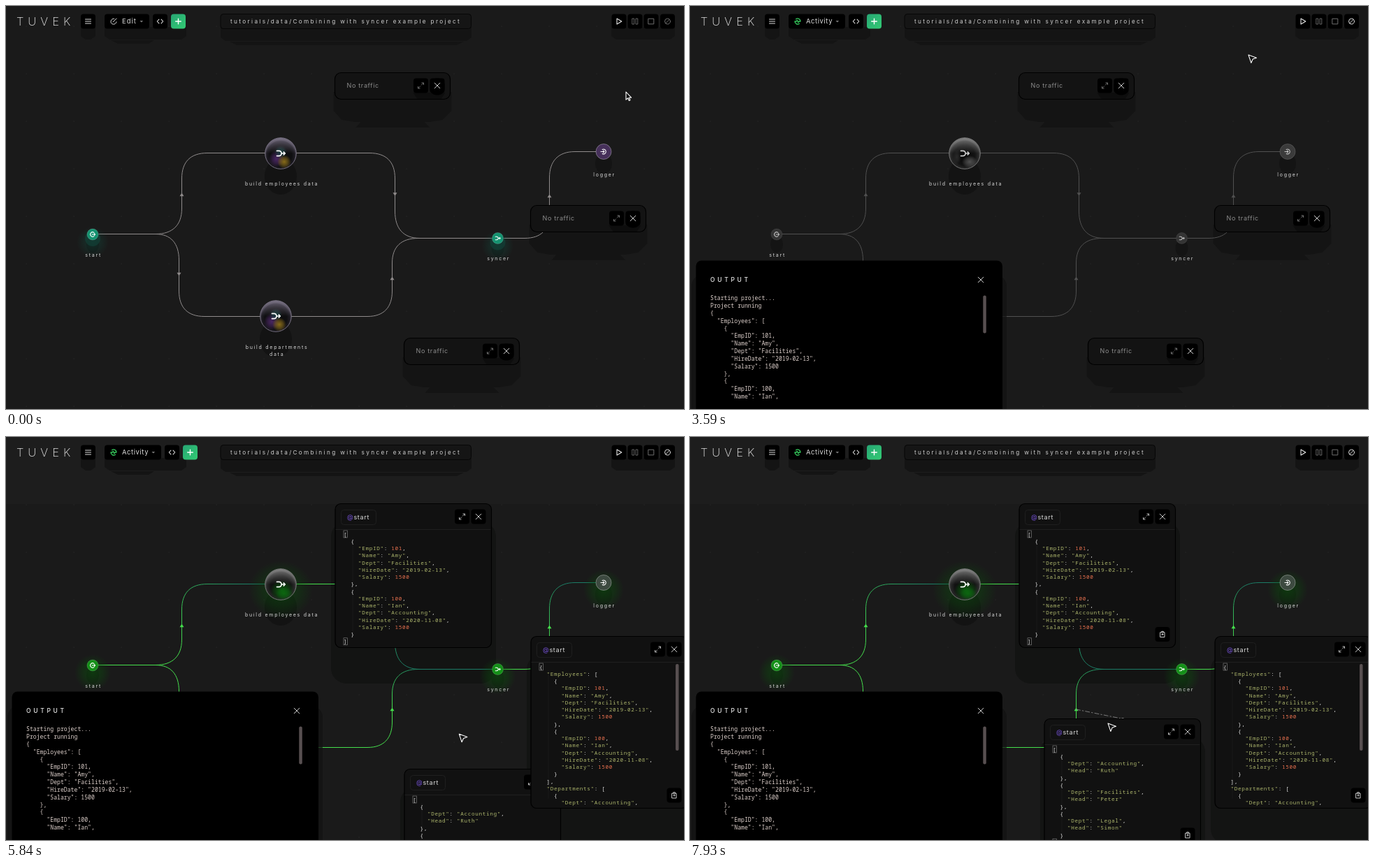
Animation, 970 px wide and 577 px high, one loop 8 s. Source, as an HTML page:

```html
<!DOCTYPE html>
<html lang="en">
<head>
<meta charset="utf-8">
<title>Flow editor</title>
<style>
html, body { margin: 0; width: 100%; height: 100%; overflow: hidden; background: #1a1a1a; }
svg { display: block; width: 970px; height: 577px; }
text { font-family: Inter, sans-serif; white-space: pre; }
.mono { font-family: "Noto Sans Mono", "DejaVu Sans Mono", monospace; }
.line { fill: none; stroke-linecap: round; stroke-linejoin: round; }
</style>
</head>
<body>
<svg id="stage" viewBox="0 0 970 577" xmlns="http://www.w3.org/2000/svg"></svg>
<script>
const LOOP = 8000, STEP = 150, LEAD = 140;
const stage = document.getElementById('stage');

const box = (x, y, w, h, fill, r = 0, extra = '') =>
  `<rect x="${x}" y="${y}" width="${w}" height="${h}" rx="${r}" fill="${fill}" ${extra}/>`;
const line = (d, color, w = 1, extra = '') =>
  `<path class="line" d="${d}" stroke="${color}" stroke-width="${w}" ${extra}/>`;
const shape = (d, fill, extra = '') => `<path d="${d}" fill="${fill}" ${extra}/>`;
const oval = (x, y, rx, ry, fill, extra = '') =>
  `<ellipse cx="${x}" cy="${y}" rx="${rx}" ry="${ry}" fill="${fill}" ${extra}/>`;
const label = (x, y, s, size, fill, gap = 0, extra = '') =>
  `<text x="${x}" y="${y}" font-size="${size}" fill="${fill}" letter-spacing="${gap}" ${extra}>${s}</text>`;
const at = (x, y, body, scale = 1) => `<g transform="translate(${x} ${y}) scale(${scale})">${body}</g>`;
const group = (id, body) => `<g id="${id}">${body}</g>`;

// Data shown in the panels
const employees = [
  { EmpID: 101, Name: 'Amy', Dept: 'Facilities', HireDate: '2019-02-13', Salary: 1500 },
  { EmpID: 100, Name: 'Ian', Dept: 'Accounting', HireDate: '2020-11-08', Salary: 1500 }
];
const departments = [
  { Dept: 'Accounting', Head: 'Ruth' },
  { Dept: 'Facilities', Head: 'Peter' },
  { Dept: 'Legal', Head: 'Simon' }
];
const rows = data => JSON.stringify(data, null, 2).split('\n');
const merged = rows({ Employees: employees, Departments: departments });

// Gradients
const stops = list => list.map(([o, c, a = 1]) =>
  `<stop offset="${o}" stop-color="${c}" stop-opacity="${a}"/>`).join('');
const radial = (id, list, extra = '') => `<radialGradient id="${id}" ${extra}>${stops(list)}</radialGradient>`;
const linear = (id, list, dir = 'x2="0" y2="1"') => `<linearGradient id="${id}" ${dir}>${stops(list)}</linearGradient>`;
const wire = (id, x1, y1, x2, y2) => linear(id, [[0, '#45df4c'], [1, '#1b7c66']],
  `gradientUnits="userSpaceOnUse" x1="${x1}" y1="${y1}" x2="${x2}" y2="${y2}"`);
const glow = (id, c, a) => radial(id, [[0, c, a], [0.55, c, a * 0.55], [1, c, 0]]);
const defs = `<defs>
  <pattern id="dots" x="-5" y="63" width="68" height="68" patternUnits="userSpaceOnUse">
    <rect x="33.5" y="33.5" width="1.2" height="1.2" fill="#282828"/></pattern>
  ${linear('add', [[0, '#27a674'], [1, '#33cb74']], 'x2="1" y2="1"')}
  ${wire('w0', 240, 300, 350, 211)}${wire('w1', 248, 390, 350, 444)}${wire('w2', 450, 211, 590, 300)}
  ${wire('w3', 552, 390, 598, 332)}${wire('w4', 765, 290, 800, 209)}
  ${glow('purple', '#7a3ba6', 0.55)}${glow('gold', '#a5821c', 0.8)}${glow('teal', '#1d8076', 0.4)}
  ${glow('green', '#0c6a10', 0.85)}${glow('halo', '#0a500c', 0.6)}${glow('shine', '#909090', 0.5)}
  ${glow('mint', '#0f5c4b', 0.35)}
  ${radial('glass', [[0, '#0a0a0c'], [0.7, '#0f0f11'], [0.9, '#1d1b22'], [1, '#45414c']], 'cy=".56"')}
  ${radial('smoke', [[0, '#050505'], [0.65, '#131313'], [0.9, '#2a2a2a'], [1, '#505050']], 'cy=".56"')}
  ${linear('cap', [[0, '#a79db5', 0.5], [0.5, '#a79db5', 0]])}
  ${linear('fog', [[0, '#b0b0b0', 0.5], [0.5, '#b0b0b0', 0]])}
  <clipPath id="feed"><rect x="20" y="405" width="400" height="160"/></clipPath>
</defs>`;

// Icons, drawn around 0,0
const icon = {
  merge: c => line('M-5.5-3.6H-2.5A3.6 3.6 0 0 1-2.5 3.6H-5.5M1 0H6.2M4.3-2L6.3 0 4.3 2', c, 1.7),
  out: c => line('M2.2-3A3.8 3.8 0 1 0 2.2 3M-1 0H4.2M2.7-1.6L4.3 0 2.7 1.6', c, 1.2),
  into: c => line('M-2-3.3A3.8 3.8 0 1 1-2 3.3M-4.5 0H1M-.6-1.6L1 0-.6 1.6', c, 1.2),
  close: c => line('M-3.8-3.8L3.8 3.8M3.8-3.8L-3.8 3.8', c, 0.9),
  expand: c => line('M1-1L3.8-3.8M1.4-4H4V-1.4M-1 1L-3.8 3.8M-1.4 4H-4V1.4', c, 0.8),
  menu: c => line('M-4-3H4M-4 0H4M-4 3H4', c, 1),
  code: c => line('M-1.6-2.8L-4.2 0-1.6 2.8M1.6-2.8L4.2 0 1.6 2.8', c, 1.1),
  plus: c => line('M-3.8 0H3.8M0-3.8V3.8', c, 1.4),
  edit: c => line('M.8-3.8A4 4 0 1 0 4 .8M-1 1L4-4', c, 1),
  pulse: c => line('M-2.4-3.2A4 4 0 0 1 4 0M2.4 3.2A4 4 0 0 1-4 0M-4 0H-2L-.6-1.6 .8 1.6 2 0H4', c, 1.3),
  play: c => line('M-3-4L3.8 0-3 4Z', c, 1.1),
  pause: c => line('M-3.8-4H-1.4V4H-3.8ZM1.4-4H3.8V4H1.4Z', c, 0.9),
  stop: c => line('M-3.8-3.8H3.8V3.8H-3.8Z', c, 1),
  ban: c => line('M4 0A4 4 0 1 1-4 0A4 4 0 1 1 4 0M-2.8 2.8L2.8-2.8', c, 1),
  again: c => line('M2.8-1.8A3.5 3.5 0 1 0 3.5 .8M3.2-4.4V-1.6H.4', c, 1.2),
  clip: c => line('M-3-2.8H3V4H-3ZM-1.3-2.8V-4.2H1.3V-2.8M-1.2 0H1.2M0-1.2V1.2', c, 0.9)
};
const button = (x, y, name, c = '#dcdcdc', size = 21) =>
  at(x, y, box(-size / 2, -size / 2, size, size, '#000', 4) + icon[name](c));

// Toolbar
const shade = '#141414';
const drop = (x, w, h = 17) => shape(
  `M${x} 30H${x + w}V${26 + h}L${x + w - 7} ${31 + h}H${x + 7}L${x} ${26 + h}Z`, shade);

const backdrop = defs + box(0, 0, 970, 577, '#1a1a1a') + box(0, 0, 970, 577, 'url(#dots)');
const bar = drop(107, 21) + drop(141, 117) + drop(307, 359, 19) + drop(866, 91) +
  shape('M150 49H212L204 54H160ZM320 51H655L645 56H330Z', shade) +
  label(15, 28, 'TUVEK', 16.5, '#ececec', 6, 'font-weight="200"') +
  button(117.5, 22, 'menu') +
  box(307, 11.5, 358.5, 21, '#151515', 4, 'stroke="#060606"') +
  label(321, 24.6, 'tutorials/data/Combining with syncer example project', 8.2, '#cfcfcf', 2.37);

const mode = (name, glyph, tint, w, gap) =>
  box(141, 11.5, w, 21, '#000', 4) + at(154, 22, icon[glyph](tint)) +
  label(166, 25.3, name, 9.5, '#dcdcdc', gap) +
  shape(`M${w + 127.5} 21h4.6l-2.3 2.6Z`, '#777') +
  button(w + 156.5, 22, 'code') +
  at(w + 182.5, 22, box(-10.5, -10.5, 21, 21, 'url(#add)', 4) + icon.plus('#fff'));

const controls = (first, stop, ban) =>
  button(877, 22, first, '#e6e6e6') + button(900, 22, 'pause', '#6e6e6e') +
  button(923, 22, 'stop', stop) + button(946.5, 22, 'ban', ban);

// Graph
const wires = [
  'M132 326.5H214C238 326.5 251.5 314 251.5 290V247C251.5 223 264 210.5 288 210.5H371',
  'M132 326.5H214C236 326.5 247.5 340 247.5 364V408C247.5 432 260 444.5 284 444.5H364',
  'M415 210.5H520C544 210.5 556.5 223 556.5 247V294C556.5 318 568 332.5 592 332.5H696',
  'M408 444.5H517C541 444.5 552.5 431 552.5 408V368C552.5 345 565 332.5 590 332.5H592',
  'M712 332.5H742C766 332.5 777.5 320 777.5 297V246C777.5 222 790 208.5 814 208.5H844'
];
const arrows = [[251.5, 270, 1], [247.5, 384, -1], [556.5, 269.5, -1], [552.5, 390, 1], [777.5, 272, 1]];

const orb = (x, y, state) => {
  const live = state === 2, gray = state > 0;
  const spots = [
    oval(-6, 8, 11, 12, 'url(#purple)') + oval(0, -2, 9, 9, 'url(#teal)') + oval(5, 12, 10, 10, 'url(#gold)'),
    oval(7, 12, 11, 9, 'url(#shine)') + oval(-11, 5, 6, 11, 'url(#shine)', 'opacity=".4"'),
    oval(2, 9, 17, 15, 'url(#green)') + oval(5, 13, 12, 9, 'url(#green)')
  ][state];
  return at(x, y,
    oval(0, 33, 23, 26, '#131313') +
    (live ? oval(0, 8, 46, 42, 'url(#halo)') : '') +
    oval(0, 0, 22.3, 22.3, gray ? 'url(#smoke)' : 'url(#glass)') + spots +
    oval(0, 0, 22.3, 22.3, gray ? 'url(#fog)' : 'url(#cap)', `stroke="${gray ? '#7c7c7c' : '#7d768a'}" stroke-width=".9"`) +
    icon.merge(state === 1 ? '#cfcfcf' : '#fff'));
};

const pin = (x, y, r, glyph, state, fills, scale) => at(x, y,
  oval(0, r + 6, r + 1, r + 4, '#141414') +
  (state === 2 ? oval(0, 10, r + 18, r + 18, 'url(#halo)') : '') +
  (state === 0 && r < 9 ? oval(0, 11, 23, 22, 'url(#mint)') + oval(0, 6, 11, 11, '#12443a', 'opacity=".6"') : '') +
  oval(0, 0, r, r, fills[state], `stroke="${state === 1 ? '#909090' : '#fff'}" stroke-opacity="${r > 9 ? 0.4 : 0.2}" stroke-width=".8"`) +
  at(0, 0, icon[glyph](state === 1 ? '#c0c0c0' : '#fff'), scale));

const names = [
  [394.6, 257.3, 'build employees data'], [387.6, 491.2, 'build departments'], [387.6, 501.4, 'data'],
  [125.2, 358.6, 'start'], [704.7, 364.3, 'syncer'], [856.1, 243.5, 'logger']
].map(([x, y, s]) => label(x, y, s, 7, '#d6d6d6', 1.74, 'text-anchor="middle"')).join('');

const graph = state => {
  const ink = ['#8f8b8b', '#505050', '#45df4c'][state];
  const leaf = ['#159270', '#343434', '#149018'];
  return wires.map((d, i) => line(d, state === 2 ? `url(#w${i})` : ink)).join('') +
    arrows.map(([x, y, dir]) => at(x, y, shape(`M-3 ${2.2 * dir}H3L0 ${-2.6 * dir}Z`, ink))).join('') +
    orb(393, 211, state) + orb(386, 444, state) +
    pin(124, 327, 8, 'out', state, leaf, 0.85) +
    pin(703.5, 332.5, 8, 'merge', state, leaf, 0.6) +
    pin(855, 208.5, 11, 'into', state, ['#46305a', '#3b3b3b', '#3d4a40'], 0.9) + names;
};

// Traffic panels; their shadows lie under the graph
const idleSpots = [[470.5, 95], [750.5, 285], [569.5, 475]];
const idleShade = ([x, y]) => at(x, y,
  shape('M-2 28L-2 55 10 68 28 71 37 71 30 79H136L128 71 136 71 154 68 167 55V28Z', shade));
const idle = ([x, y]) => at(x, y,
  box(0, 0.5, 165, 38, '#131313', 9, 'stroke="#000" stroke-width="1.2"') +
  shape('M112 29H158L152 38H118Z', '#0d0d0d') +
  label(17, 22.2, 'No traffic', 9, '#8c8c8c', 0.67) +
  button(123, 19, 'expand', '#8a8a8a') + box(136, 8.5, 21, 24, '#000', 9) + button(146.5, 19, 'close', '#e2e2e2'));

const ROW = 10.25, CHAR = 5.25;
const paint = s => s.replace(/("[^"]*")(:?)|(\d+)/g, (all, str, colon, num) =>
  str ? `<tspan fill="#acb56c">${str}</tspan>${colon}` : `<tspan fill="#e8714f">${num}</tspan>`);
const listing = lines => lines.map((s, i) => {
  const pad = s.search(/\S/);
  return label(12 + pad * CHAR, 46.6 + i * ROW, paint(s.trim()), 7.7, '#e4e4e4', 0.63, 'class="mono"');
}).join('');
const mark = i => box(12, 39 + i * ROW, 5.5, 10, 'none', 0, 'stroke="#777" stroke-width=".7"');

const panelShade = (id, x, y, h) => `<g id="${id}Shade" transform="translate(${x} ${y})">` +
  box(-6, 26, 236, h + 25, '#131413', 22) + '</g>';
const panel = (id, x, y, h, lines, extra) => `<g id="${id}" transform="translate(${x} ${y})">` +
  box(0, 0.5, 223.5, h - 1, '#111', 8, 'stroke="#000" stroke-width="1.2"') +
  line('M1 37.5H222', '#202020') +
  box(8.5, 9.5, 50, 21, '#111', 4, 'stroke="#1f1f1f"') +
  label(17, 23, '<tspan fill="#7a55e0">@</tspan>start', 9, '#dedede', 0.7) +
  button(181.5, 19, 'expand') + button(205, 19, 'close') +
  line(`M25 50V${h - 15}`, '#242424', 0.6) + mark(0) + listing(lines) + extra + '</g>';
const clip = (id, y) => group(id, button(205, y, 'clip'));

const spots = { emp: ['empPanel', 471, 95, 207], dept: ['deptPanel', 570, 475, 187], all: ['allPanel', 751, 285, 247] };
const liveShade = box(0, 0, 970, 96, '#1d1d1d') + Object.values(spots).map(s => panelShade(...s)).join('');
const panels =
  group('knob', oval(582.5, 300.5, 2.2, 1.2, '#8a8a8a')) +
  panel(...spots.emp, rows(employees), mark(15) + clip('empClip', 187.5)) +
  group('tether', '') +
  panel(...spots.dept, rows(departments), mark(13) + clip('deptClip', 167)) +
  panel(...spots.all, merged.slice(0, 20), box(207, 40, 4.5, 124, '#574f50', 2) + clip('allClip', 228));

// Output window
const log = ['Starting project...', 'Project running', ...merged].slice(0, 14);
const logRow = (s, i) => label(29, 421.3 + i * 10.82, s, 8.17, '#dccfca', 0, 'class="mono"');
const output = box(2, 385, 451, 220, '#121212', 16, 'opacity=".7"') +
  box(8.5, 364.5, 438.5, 240, '#000', 8) +
  label(29, 395, 'OUTPUT', 8.5, '#e8e8e8', 3.7, 'font-weight="500"') +
  at(416, 392, icon.close('#e2e2e2')) +
  log.slice(0, 2).map(logRow).join('') +
  group('feedRows', `<g clip-path="url(#feed)">${log.map((s, i) => i > 1 ? logRow(s, i) : '').join('')}</g>` +
    box(419.3, 414.5, 4.5, 54, '#574f50', 2));

// Pointers
const outline = 'stroke="#fff" stroke-width="1.1" stroke-linejoin="round"';
const pointers = group('pointer',
  group('arrow', shape('M0 0V11.2L2.6 8.8 4.4 12.6 6 11.8 4.3 8.2H7.6Z', '#111', outline)) +
  group('hand', shape('M-1.2 1C-1.2-.5 1-.5 1 1V4.5C2-.0 3 4 3 4.6 4 3.8 5 4.4 5 5.2 6 4.8 6.6 5.4 6.6 6.4V9L5.4 12H-.8L-4 7.4C-4.3 6.2-3 5.8-2.2 6.8L-1.2 7.6Z',
    '#fff', 'stroke="#000" stroke-width=".7"') + line('M1 8V10.5M3 8V10.5', '#333', 0.6)) +
  group('dart', shape('M0 0L11.5 4.2 6.2 6.1 3.8 11.4Z', '#111', outline)));

stage.innerHTML = backdrop +
  group('idleShade', idleSpots.map(idleShade).join('')) + group('liveShade', liveShade) +
  [0, 1, 2].map(s => group('graph' + s, graph(s))).join('') + bar +
  group('editMode', mode('Edit', 'edit', '#dcdcdc', 64, 0.95)) +
  group('liveMode', mode('Activity', 'pulse', '#35c95c', 81, 0.55)) +
  group('ready', controls('play', '#6e6e6e', '#6e6e6e')) +
  group('running', controls('again', '#dcdcdc', '#dcdcdc')) +
  group('done', controls('play', '#6e6e6e', '#dcdcdc')) +
  group('idle', idleSpots.map(idle).join('')) +
  group('live', panels) + group('output', output) + pointers;

const el = id => document.getElementById(id);
const show = (id, on) => el(id).setAttribute('display', on ? 'inline' : 'none');
const move = (id, x, y) => el(id).setAttribute('transform', `translate(${x} ${y})`);

// Piecewise linear tracks: time, x, y
const pointerTrack = [
  [-10, 887, 123], [590, 881, 68], [1040, 876, 25], [2840, 876, 25], [2990, 845, 70], [3140, 798, 132],
  [3290, 798, 132], [3440, 799, 104], [3590, 799, 70], [5090, 799, 70], [5240, 738, 190], [5390, 674, 309],
  [5690, 645, 400], [6140, 655, 476], [6890, 615, 441], [7190, 605, 425], [7930, 598, 410]
];
const dragTrack = [[6140, 570, 475], [6890, 530, 440.5], [7190, 516, 422], [7930, 507, 403]];
const follow = (track, t) => {
  const i = track.findIndex(k => k[0] > t);
  if (i === 0) return track[0].slice(1);
  if (i < 0) return track[track.length - 1].slice(1);
  const [a, b] = [track[i - 1], track[i]], f = (t - a[0]) / (b[0] - a[0]);
  return [a[1] + (b[1] - a[1]) * f, a[2] + (b[2] - a[2]) * f];
};

function render(time) {
  const t = time >= 7930 ? 7930 : LEAD + Math.floor((time - LEAD) / STEP) * STEP;
  const state = t < 2240 ? 0 : t < 4190 ? 1 : 2;
  for (let s = 0; s < 3; s++) show('graph' + s, s === state);
  show('editMode', state === 0);
  show('liveMode', state > 0);
  show('ready', t < 2240);
  show('running', t >= 2240 && t < 2990);
  show('done', t >= 2990);
  for (const part of ['', 'Shade']) {
    show('idle' + part, state < 2);
    show('live' + part, state === 2);
  }
  show('output', state > 0);
  show('feedRows', t >= 2990);
  show('knob', t >= 5240 && t < 5690);
  show('empClip', t < 5690 || t >= 7340);

  const [px, py] = follow(dragTrack, t);
  move('deptPanel', px, py);
  move('deptPanelShade', px, py);
  show('tether', t >= 6140);
  el('tether').innerHTML = line(`M552.5 390L${px + 112} ${py + 0.5}`, '#858585', 0.9, 'stroke-dasharray="6 3 1.5 3"') +
    oval(px + 112, py + 0.5, 2.2, 1.2, '#9a9a9a');

  move('pointer', ...follow(pointerTrack, t));
  show('arrow', t < 1040);
  show('hand', t >= 1040 && t < 2990);
  show('dart', t >= 2990);
}

const start = performance.now();
(function tick() {
  render((performance.now() - start) % LOOP);
  requestAnimationFrame(tick);
})();
</script>
</body>
</html>
```
